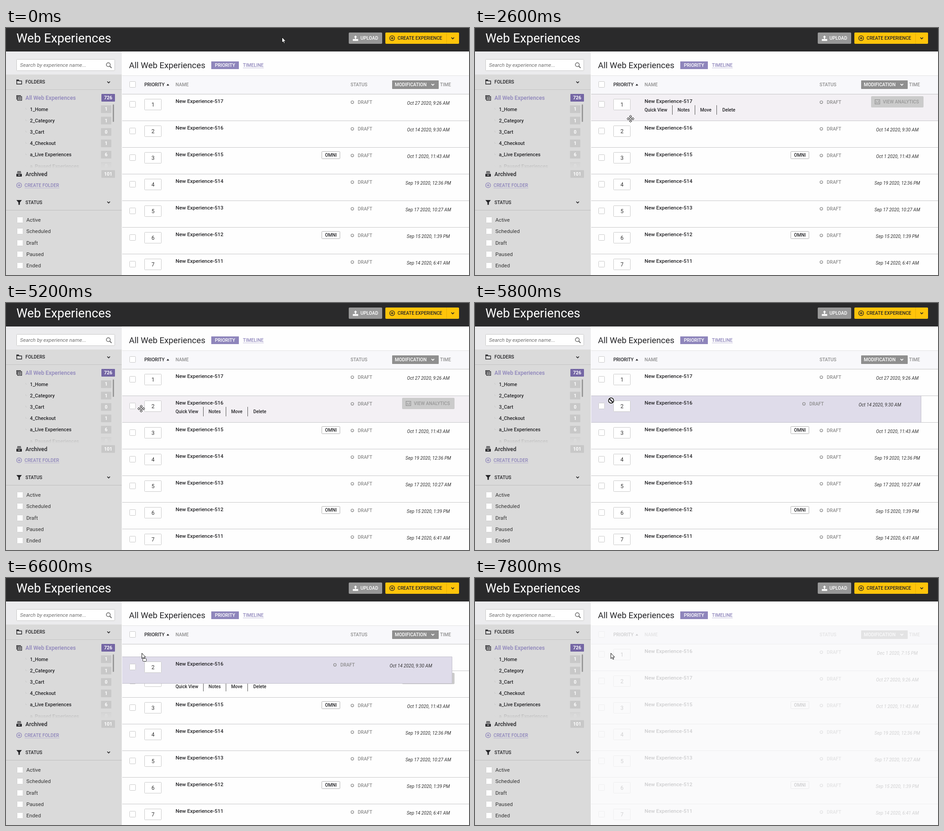
An HTML page that plays this animation: 1024 by 547 pixels, repeating every 8000 ms.

```html
<!DOCTYPE html>
<html lang="en">
<head>
<meta charset="utf-8">
<title>Web Experiences</title>
<style>
  html, body { margin: 0; width: 100%; height: 100%; overflow: hidden; background: #fefefe; }
  svg { display: block; width: 100vw; height: 100vh; font-family: Roboto, sans-serif; }
</style>
</head>
<body>
<svg viewBox="0 0 1024 547">
  <defs>
    <linearGradient id="fade" x1="0" y1="0" x2="0" y2="1">
      <stop offset="0" stop-color="#dadada" stop-opacity="0"/>
      <stop offset="1" stop-color="#dadada"/>
    </linearGradient>
  </defs>
  <g id="sidebar"></g>
  <g id="table"></g>
  <g id="topbar"></g>
  <g id="pointer"></g>
</svg>
<script>
const LOOP = 8000, STEP = 200, ROW_H = 59, TABLE_Y = 147;
const INK = '#252528', GRAY = '#8e8e8e', PURPLE = '#8e85bb';
const CAPS = 10.3;

const rect = (x, y, w, h, fill, extra = '') =>
  `<rect x="${x}" y="${y}" width="${w}" height="${h}" fill="${fill}" ${extra}/>`;
const box = (x, y, w, h, stroke = '#c9c9c9', fill = '#fff') =>
  rect(x + .5, y + .5, w - 1, h - 1, fill, `stroke="${stroke}" rx="1"`);
const path = (d, stroke, width = 1, fill = 'none', extra = '') =>
  `<path d="${d}" stroke="${stroke}" stroke-width="${width}" fill="${fill}" ${extra}/>`;
const ring = (x, y, r, stroke, width = 1.3) =>
  `<circle cx="${x}" cy="${y}" r="${r}" fill="none" stroke="${stroke}" stroke-width="${width}"/>`;
const hline = (x1, x2, y, color) => path(`M${x1} ${y + .5}H${x2}`, color);
// Text is placed by the vertical centre of its capitals.
const text = (x, cy, str, size, fill = INK, weight = 500, extra = '') =>
  `<text x="${x}" y="${cy + size * .355}" font-size="${size}" fill="${fill}" font-weight="${weight}" ${extra}>${str}</text>`;
const centred = 'text-anchor="middle"', italic = 'font-style="italic"';
const chevron = (x, y, color = INK) => path(`M${x - 3} ${y - 1.5}l3 3l3 -3`, color, 1.7);
const plus = (x, y, color) => ring(x, y, 5.4, color) + path(`M${x - 3} ${y}h6M${x} ${y - 3}v6`, color, 1.3);
const move = (x, y, content) => `<g transform="translate(${x} ${y})">${content}</g>`;
const put = (id, content) => document.getElementById(id).innerHTML = content;

function sidebar() {
  const folders = [['1_Home', 1], ['2_Category', 1], ['3_Cart', 0], ['4_Checkout', 1],
    ['a_Live Experiences', 6], ['a_Paused Experiences', 0]];
  const states = ['Active', 'Scheduled', 'Draft', 'Paused', 'Ended'];
  const badge = (x, cy, w, n, fill = '#c8c8c8') =>
    rect(x, cy - 8.5, w, 17, fill, 'rx="1"') + text(x + w / 2, cy, n, 10.4, '#fff', 700, centred);

  let s = rect(0, 52, 256, 495, '#dadada') + rect(0, 52, 256, 51, '#ebebed');
  s += box(23, 69, 218, 26) + text(31, 82, 'Search by experience name...', 11.6, '#707070', 400, italic);
  s += ring(226.3, 81.3, 4.3, '#666', 1.5) + path('M229.5 84.5l4 4', '#666', 1.8);
  s += path('M23.7 124.3V115.2H27.8L29 117.2H34.6V124.3Z', INK, 1.4) + rect(23, 114.5, 5.5, 3, INK);
  s += text(43, 119.5, 'FOLDERS', CAPS) + chevron(227, 120) + hline(0, 256, 136, '#c3c3c3');

  s += path('M23.7 158.5V149.7H33', INK, 1.4) + path('M25.8 151.9H34.6V160.4H25.8Z', INK, 1.4);
  s += path('M27.5 154.5H33M27.5 157.5H33', INK, 1.4);
  s += text(43, 154.5, 'All Web Experiences', 12.25, PURPLE) + badge(211, 154.5, 30, 726, '#7466a4');

  folders.forEach(([name, count], i) => {
    const y = 179.8 + i * 25.2;
    s += path(`M43.5 ${y - 3}v3h3`, '#cbcbcb') + text(53, y, name, 10.8) + badge(210, y, 23, count);
  });
  s += rect(40, 290, 200, 21, 'url(#fade)') + rect(40, 310, 200, 5, '#dadada');
  s += rect(40, 298, 200, 14, '#dadada', 'opacity=".55"');
  s += rect(236, 169, 3, 39, '#999', 'rx="1.5"');

  s += path('M25 318H33M24.5 320.7H33.5', INK, 1.4) + rect(23, 323, 12, 6, INK) + rect(26.5, 325, 5, 1.5, '#dadada');
  s += text(43, 323.3, 'Archived', 12.3) + badge(211, 323.3, 30, 101);
  s += plus(29, 348.3, PURPLE) + text(41, 348.5, 'CREATE FOLDER', 10.2, PURPLE) + hline(41, 118, 354, '#bbb5d3');

  s += path('M23 381H35L30.7 386.5V391.5H27.5V386.5Z', 'none', 0, INK);
  s += text(43, 386, 'STATUS', CAPS) + chevron(227, 386) + hline(0, 256, 403, '#bdbdbd');
  states.forEach((name, i) => {
    const y = 425 + i * 25.25;
    s += box(24, Math.round(y) - 7, 14, 14, '#d0d0d0') + text(45, y, name, 11.6, '#333', 400);
  });
  return s;
}

function topbar() {
  let s = rect(0, 0, 1024, 52, '#2a2a2b') + text(23, 22.5, 'Web Experiences', 27.6, '#fff', 400);
  s += rect(758, 10, 74, 25, '#989898', 'rx="2"') + text(784, 22.7, 'UPLOAD', CAPS, '#fff');
  s += path('M773 16.5L776.6 20.5H774.2V24H771.8V20.5H769.4Z', 'none', 0, '#fff') + rect(767, 24.5, 12, 4, '#fff');
  s += rect(839, 10, 163, 25, '#ffc40a', 'rx="2"') + path('M974.5 10V35', '#e5ae06');
  s += plus(854, 22.5, INK) + text(866, 22.7, 'CREATE EXPERIENCE', 10.2) + chevron(988, 22.5);
  s += text(272, 82, 'All Web Experiences', 18.8, INK, 400);
  s += rect(454, 74, 61, 17, PURPLE) + text(462, 82.7, 'PRIORITY', CAPS, '#fff');
  s += text(524, 82.7, 'TIMELINE', CAPS, PURPLE) + hline(524, 570, 88, '#c4bfdc');
  return s;
}

function tableHead() {
  let s = rect(257, 105, 767, 42, '#f8f8fb') + hline(257, 1024, 105, '#e2e2e4') + hline(257, 1024, 146, '#c3c3c5');
  s += box(273, 118, 14, 14) + text(306, 125.3, 'PRIORITY', CAPS) + path('M355 127.5L358 123.5L361 127.5Z', 'none', 0, INK);
  s += text(375, 125.3, 'NAME', CAPS, GRAY) + text(762, 125.3, 'STATUS', CAPS, GRAY);
  s += rect(854, 116, 103, 19, '#8f8f8f', 'rx="1"') + text(860, 125.3, 'MODIFICATION', 10.2, '#fff');
  s += chevron(944, 125.3, '#fff') + text(960, 125, 'TIME', CAPS, GRAY);
  return s;
}

// Row contents, relative to the row's top edge.
function row({ rank, id, date, omni, hover, shade = '#f3f0f4', shift = 0 }) {
  let s = hover ? rect(257, 0, 767, 58, shade) : '';
  s += box(273, 15, 14, 14) + box(306, 10, 38, 25) + text(325, 23, rank, 12, '#333', 400, centred);
  s += text(375, 15.2, `New Experience-${id}`, 11.5);
  if (omni) s += box(698, 126 - 126 + 8, 41, 17, '#b0b0b0') + text(718.5, 16.5, 'OMNI', 10.2, INK, 500, centred);
  s += ring(766 - shift, 17.3, 2.9, GRAY, 1.4) + text(778 - shift, 17.5, 'DRAFT', CAPS, GRAY);
  if (!hover) return s + text(934 - shift, 19.7, date, 10.15, '#333', 400, `${centred} ${italic}`);
  [['Quick View', 375], ['Notes', 448], ['Move', 498], ['Delete', 547]].forEach(([label, x]) =>
    s += text(x, 34.3, label, 10.1));
  s += path('M436.5 24V45M486.5 24V45M534.5 24V45', '#555');
  s += rect(876, 4, 116, 25, '#cbcbcb', 'rx="2"') + text(902, 16.5, 'VIEW ANALYTICS', 10.2, '#999');
  s += path('M884.7 11.7H895.3V21.3H884.7Z', '#999', 1.4) + path('M887.5 19V15M890 19V17M892.5 19V14', '#999', 1.3);
  return s;
}

const items = [
  [517, 'Oct 27 2020, 9:26 AM'], [516, 'Oct 14 2020, 9:30 AM'], [515, 'Oct 1 2020, 11:43 AM', true],
  [514, 'Sep 19 2020, 12:36 PM'], [513, 'Sep 17 2020, 10:27 AM'], [512, 'Sep 15 2020, 1:39 PM', true],
  [511, 'Sep 14 2020, 6:41 AM'],
].map(([id, date, omni], i) => ({ id, date, omni, rank: i + 1 }));

// Linear interpolation through [time, ...values] keys.
function along(keys, t) {
  const i = keys.findIndex(k => k[0] > t);
  if (i < 1) return keys[i ? keys.length - 1 : 0].slice(1);
  const a = keys[i - 1], b = keys[i], p = (t - a[0]) / (b[0] - a[0]);
  return a.slice(1).map((v, j) => v + (b[j + 1] - v) * p);
}

const pointerKeys = [
  [600, 610, 20], [1600, 400, 112], [2000, 400, 112], [2200, 366, 152], [2600, 344, 201], [3200, 346, 246],
  [4200, 332, 228], [4400, 292, 230], [4800, 293, 230], [5200, 299, 234], [5400, 299, 234],
  [5800, 301, 216], [6000, 301, 207], [6400, 300, 166],
];
const dragKeys = [[5800, 0], [6000, -5], [6400, -31]];
const DRAG = 5600, SWAP = 6200, DROP = 6800, SAVED = 7600;

function table(t, y) {
  const [first, second, ...rest] = items;
  let rows = [first, second];
  if (t >= SAVED) rows = [{ ...second, rank: 1, date: 'Dec 1 2020, 7:15 PM' }, { ...first, rank: 2 }];
  else if (t >= SWAP) rows = [null, { ...first, hover: t < DROP, shade: '#fefefe' }];
  else if (t >= DRAG) rows = [first, null];
  else rows = rows.map((r, i) => ({ ...r, hover: Math.floor((y - TABLE_Y) / ROW_H) === i }));

  let s = rect(256, 52, 768, 495, '#fefefe') + tableHead();
  [...rows, ...rest].forEach((r, i) => {
    const top = TABLE_Y + i * ROW_H;
    if (r) s += move(0, top, row(r));
    s += hline(257, 1024, top + 58, '#c6c6c8');
  });
  if (t >= DRAG && t < DROP) {
    const [offset] = along(dragKeys, t);
    s += move(0, TABLE_Y + ROW_H + offset,
      rect(257, 0, 730, 58, '#dfdcea') + path('M257 -.5H986.5V58.5H257', '#c2c0cb') + row({ ...second, shift: 38.5 }));
  }
  if (t >= DROP) s += rect(257, 105, 767, 442, '#f9f9fb', 'opacity=".8"');
  return s;
}

const arrow = path('M.5 .5V12.5L3.2 10L5.1 14.2L7 13.4L5.1 9.2H8.8Z', '#111', 1, '#fff');
const cursors = {
  arrow,
  drop: arrow + box(2, 12, 9, 7, '#333'),
  move: path('M0 -8L3 -5H1V-1H5V-3L8 0L5 3V1H1V5H3L0 8L-3 5H-1V1H-5V3L-8 0L-5 -3V-1H-1V-5H-3Z', '#222', 1, '#fff'),
  beam: path('M-2.5 -6.5H-.8L0 -5.8L.8 -6.5H2.5M0 -6V6M-2.5 6.5H-.8L0 5.8L.8 6.5H2.5', '#111', 1.2),
  blocked: ring(0, 0, 5.8, '#fff', 4) + ring(0, 0, 5.8, '#111', 1.8) + path('M-4 -4L4 4', '#111', 1.8),
};

function cursorKind(t, x, y) {
  if (t >= DROP || y < TABLE_Y) return 'arrow';
  if (t >= SWAP) return 'drop';
  if (t >= DRAG) return 'blocked';
  const rowY = (y - TABLE_Y) % ROW_H;
  return x > 306 && x < 344 && rowY > 10 && rowY < 35 ? 'beam' : 'move';
}

put('sidebar', sidebar());
put('topbar', topbar());

let shown = -1;
function frame(now) {
  const t = Math.floor(now % LOOP / STEP) * STEP;
  if (t !== shown) {
    shown = t;
    const [x, y] = along(pointerKeys, t);
    put('table', table(t, y));
    put('pointer', move(x, y, cursors[cursorKind(t, x, y)]));
  }
  requestAnimationFrame(frame);
}
frame(performance.now());
</script>
</body>
</html>
```
